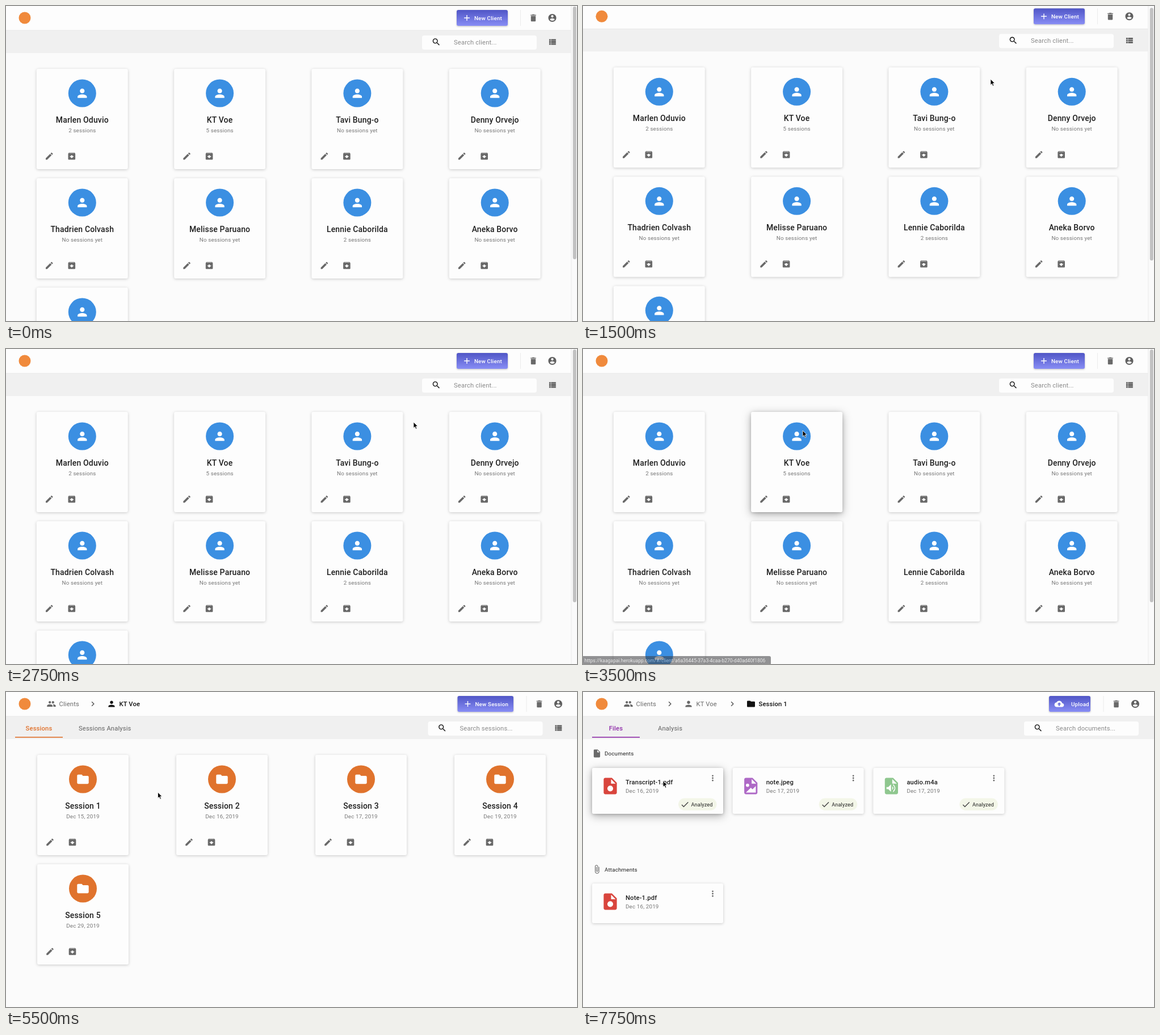
An HTML page for the animation above (8000 ms loop, 1006 px wide and 556 px high).

```html
<!DOCTYPE html>
<html lang="en">
<head>
<meta charset="utf-8">
<title>Client sessions</title>
<style>
  html, body { margin: 0; width: 100%; height: 100%; overflow: hidden; background: #fbfbfb; }
  svg { display: block; font-family: Roboto, sans-serif; letter-spacing: .01em; }
  .card { fill: #fdfdfd; filter: drop-shadow(0 1.5px 2.5px rgba(0, 0, 0, .2)); }
  .lift { fill: #fdfdfd; opacity: 0; filter: drop-shadow(0 4px 8px rgba(0, 0, 0, .3)); }
  .button { fill: url(#violet); filter: drop-shadow(0 1px 1.5px rgba(0, 0, 0, .25)); }
</style>
</head>
<body>
<svg id="stage" width="1006" height="556" viewBox="0 0 1006 556"></svg>
<script>
const GREY = '#696969', DARK = '#1f1f1f', SOFT = '#777';
const icons = {
  person: 'M12 12c2.21 0 4-1.79 4-4s-1.79-4-4-4-4 1.79-4 4 1.79 4 4 4zm0 2c-2.67 0-8 1.34-8 4v2h16v-2c0-2.66-5.33-4-8-4z',
  people: 'M16 11c1.66 0 3-1.34 3-3s-1.34-3-3-3-3 1.34-3 3 1.34 3 3 3zm-8 0c1.66 0 3-1.34 3-3S9.66 5 8 5 5 6.34 5 8s1.34 3 3 3zm0 2c-2.33 0-7 1.17-7 3.5V19h14v-2.5c0-2.33-4.67-3.5-7-3.5zm8 0c-.29 0-.62.02-.97.05 1.16.84 1.97 1.97 1.97 3.45V19h6v-2.5c0-2.33-4.67-3.5-7-3.5z',
  edit: 'M3 17.25V21h3.75L17.81 9.94l-3.75-3.75L3 17.25zM20.71 7.04c.39-.39.39-1.02 0-1.41l-2.34-2.34c-.39-.39-1.02-.39-1.41 0l-1.83 1.83 3.75 3.75 1.83-1.83z',
  archive: 'M20.54 5.23l-1.39-1.68C18.88 3.21 18.47 3 18 3H6c-.47 0-.88.21-1.16.55L3.46 5.23C3.17 5.57 3 6.02 3 6.5V19c0 1.1.9 2 2 2h14c1.1 0 2-.9 2-2V6.5c0-.48-.17-.93-.46-1.27zM12 17.5L6.5 12H10v-2h4v2h3.5L12 17.5zM5.12 5l.81-1h12l.94 1H5.12z',
  trash: 'M6 19c0 1.1.9 2 2 2h8c1.1 0 2-.9 2-2V7H6v12zM19 4h-3.5l-1-1h-5l-1 1H5v2h14V4z',
  account: 'M12 2C6.48 2 2 6.48 2 12s4.48 10 10 10 10-4.48 10-10S17.52 2 12 2zm0 3c1.66 0 3 1.34 3 3s-1.34 3-3 3-3-1.34-3-3 1.34-3 3-3zm0 14.2c-2.5 0-4.71-1.28-6-3.22.03-1.99 4-3.08 6-3.08 1.99 0 5.97 1.09 6 3.08-1.29 1.94-3.5 3.22-6 3.22z',
  search: 'M15.5 14h-.79l-.28-.27C15.41 12.59 16 11.11 16 9.5 16 5.91 13.09 3 9.5 3S3 5.91 3 9.5 5.91 16 9.5 16c1.61 0 3.09-.59 4.23-1.57l.27.28v.79l5 4.99L20.49 19l-4.99-5zm-6 0C7.01 14 5 11.99 5 9.5S7.01 5 9.5 5 14 7.01 14 9.5 11.99 14 9.5 14z',
  list: 'M4 14h4v-4H4zm0 5h4v-4H4zM4 9h4V5H4zm5 5h12v-4H9zm0 5h12v-4H9zM9 5v4h12V5z',
  add: 'M19 13h-6v6h-2v-6H5v-2h6V5h2v6h6z',
  chevron: 'M10 6L8.59 7.41 13.17 12l-4.58 4.59L10 18l6-6z',
  folder: 'M10 4H4c-1.1 0-2 .9-2 2v12c0 1.1.9 2 2 2h16c1.1 0 2-.9 2-2V8c0-1.1-.9-2-2-2h-8z',
  upload: 'M19.35 10.04C18.67 6.59 15.64 4 12 4 9.11 4 6.6 5.64 5.35 8.04 2.34 8.36 0 10.91 0 14c0 3.31 2.69 6 6 6h13c2.76 0 5-2.24 5-5 0-2.64-2.05-4.78-4.65-4.96zM14 13v4h-4v-4H7l5-5 5 5z',
  file: 'M6 2c-1.1 0-2 .9-2 2v16c0 1.1.9 2 2 2h12c1.1 0 2-.9 2-2V8l-6-6zm7 7V3.5L18.5 9z',
  clip: 'M16.5 6v11.5c0 2.21-1.79 4-4 4s-4-1.79-4-4V5c0-1.38 1.12-2.5 2.5-2.5s2.5 1.12 2.5 2.5v10.5c0 .55-.45 1-1 1s-1-.45-1-1V6H10v9.5c0 1.38 1.12 2.5 2.5 2.5s2.5-1.12 2.5-2.5V5c0-2.21-1.79-4-4-4S7 2.79 7 5v12.5c0 3.04 2.46 5.5 5.5 5.5s5.5-2.46 5.5-5.5V6z',
  check: 'M9 16.2L4.8 12l-1.4 1.4L9 19 21 7l-1.4-1.4z',
  more: 'M10 6a2 2 0 1 1 4 0 2 2 0 1 1-4 0m0 6a2 2 0 1 1 4 0 2 2 0 1 1-4 0m0 6a2 2 0 1 1 4 0 2 2 0 1 1-4 0',
  dot: 'M8.5 15a3.5 3.5 0 1 1 7 0 3.5 3.5 0 1 1-7 0',
  picture: 'M6 20h12v-8l-4 4-2-2zM6 11a2 2 0 1 1 4 0 2 2 0 1 1-4 0',
  speaker: 'M6 13.2h2.2L11.5 10v9l-3.300-3.200H6zM13 12.200q2.500 2.300 0 4.600zM14 9.500q5.500 5 0 10v-1.500q3.500-3.500 0-7z'
};

const rect = (x, y, w, h, fill, r = 0, cls = '') =>
  `<rect x="${x}" y="${y}" width="${w}" height="${h}" rx="${r}" fill="${fill}" class="${cls}"/>`;
const circle = (x, y, r, fill) => `<circle cx="${x}" cy="${y}" r="${r}" fill="${fill}"/>`;
const icon = (name, x, y, fill = GREY, s = .7) =>
  `<path d="${icons[name]}" fill="${fill}" transform="translate(${x} ${y}) scale(${s}) translate(-12 -12)"/>`;
const text = (str, x, y, size, fill = DARK, weight = 400, anchor = 'start') =>
  `<text x="${x}" y="${y}" font-size="${size}" fill="${fill}" font-weight="${weight}" text-anchor="${anchor}">${str}</text>`;
const panel = (x, y, w, h, id) =>
  rect(x, y, w, h, '', 3, 'card') + `<g id="${id}">${rect(x, y, w, h, '', 3, 'lift')}</g>`;

function frame({ width, button, buttonIcon, buttonX, buttonW, searchX, hint, list }) {
  const right = width - 33;
  return rect(0, 0, width, 43, '#fdfdfd') + rect(0, 43, width, 40, '#f0f0f0') + rect(0, 42.5, width, 1, '#e9e9e9')
    + circle(33, 21, 10.5, '#f08a3c')
    + rect(buttonX, 7, buttonW, 28, '', 3, 'button')
    + icon(buttonIcon, buttonX + 18, 21, '#fff')
    + text(button, buttonX + (buttonIcon == 'add' ? 31 : 39), 24.5, 9.8, '#fff', 500)
    + rect(right - 56.5, 7, 1, 28, '#ececec')
    + icon('trash', right - 33.5, 21) + icon('account', right, 21, '#606060')
    + rect(searchX, 52, 202, 25, '#fdfdfd', 4)
    + icon('search', searchX + 25, 63.5, '#111')
    + text(hint, searchX + 56, 68, 11.2, '#8a8a8a')
    + (list ? icon('list', right, 63.5, '#606060') : '');
}

function crumbs(items) {
  return items.map(([name, label, x], i) => {
    const last = i == items.length - 1, color = last ? '#111' : GREY;
    return icon(name, x, 21, color) + text(label, x + 13.5, 25, 11.2, color, last ? 500 : 400)
      + (last ? '' : icon('chevron', [153, 263][i], 21, '#555'));
  }).join('');
}

const tabs = (active, activeX, color, other, otherX) =>
  text(active, activeX, 68, 11.2, color, 500, 'middle') + rect(16, 79, 84, 1.6, color)
  + text(other, otherX, 68, 11.2, '#606060');

function tiles(scene, items, left, pitch, color, glyph) {
  return items.map(([title, note], i) => {
    const x = left + i % 4 * pitch, y = 111 + Math.floor(i / 4) * 193, mid = x + 80.5;
    return panel(x, y, 161, 177, `lift${scene}-${i}`)
      + circle(mid, y + 43, 24.5, color) + icon(glyph, mid, y + 43, '#fff', 1.02)
      + text(title, mid, y + 95, 14, DARK, 500, 'middle')
      + text(note, mid, y + 111.5, 9.8, SOFT, 400, 'middle')
      + icon('edit', x + 22.500, y + 154) + icon('archive', x + 62, y + 154);
  }).join('');
}

function fileCard(i, x, y, title, date, color, glyph, analyzed = true) {
  return panel(x, y, 231, analyzed ? 81 : 70, 'lift2-' + i)
    + icon('file', x + 32, y + 32, color, 1.45) + icon(glyph, x + 32, y + 32, '#fff', 1.45)
    + text(title, x + 59, y + 29, 11.2, DARK, 500) + text(date, x + 59, y + 44, 9.8, SOFT)
    + icon('more', x + 212.5, y + 18)
    + (analyzed ? rect(x + 152, y + 53.5, 67.5, 21.5, '#f3f6e8', 10.75)
      + icon('check', x + 163.5, y + 64.5, '#444') + text('Analyzed', x + 174.5, y + 67.7, 9.1) : '');
}

const none = 'No sessions yet';
const clients = [['Marlen Oduvio', '2 sessions'], ['KT Voe', '5 sessions'], ['Tavi Bung-o', none], ['Denny Orvejo', none],
  ['Thadrien Colvash', none], ['Melisse Paruano', none], ['Lennie Caborilda', '2 sessions'], ['Aneka Borvo', none], ['Bonny Falg', none]];
const sessions = [15, 16, 17, 19, 29].map((day, i) => [`Session ${i + 1}`, `Dec ${day}, 2019`]);
const host = 'https://kaagapai.herokuapp.com/#/';
const links = ['client/a6a36445-37a3-4caa-b270-d40ad40f1806', 'session/1d3af6c9-73ad-43b5-9d46-dbc488b96...'];

const scenes = [
  frame({ width: 995.5, button: 'New Client', buttonIcon: 'add', buttonX: 794, buttonW: 90, searchX: 733, hint: 'Search client...', list: true })
  + tiles(0, clients, 53.8, 242.3, '#3b8fe2', 'person'),

  frame({ width: 1006, button: 'New Session', buttonIcon: 'add', buttonX: 795.5, buttonW: 98.5, searchX: 743.5, hint: 'Search sessions...', list: true })
  + crumbs([['people', 'Clients', 80], ['person', 'KT Voe', 186]])
  + tabs('Sessions', 58, '#e0702a', 'Sessions Analysis', 128)
  + tiles(1, sessions, 55, 245, '#e0732d', 'folder'),

  frame({ width: 1006, button: 'Upload', buttonIcon: 'upload', buttonX: 821, buttonW: 73, searchX: 777, hint: 'Search documents...' })
  + crumbs([['people', 'Clients', 80], ['person', 'KT Voe', 186], ['folder', 'Session 1', 296]])
  + tabs('Files', 58, '#8e2ba8', 'Analysis', 132)
  + icon('file', 24.5, 108.5) + text('Documents', 38, 112, 9.8)
  + fileCard(0, 16, 134, 'Transcript-1.pdf', 'Dec 16, 2019', '#d9453d', 'dot')
  + fileCard(1, 263.700, 134, 'note.jpeg', 'Dec 17, 2019', '#ae69c6', 'picture')
  + fileCard(2, 511.400, 134, 'audio.m4a', 'Dec 17, 2019', '#8fc78f', 'speaker')
  + icon('clip', 24.5, 313) + text('Attachments', 38, 316.5, 9.8)
  + fileCard(3, 16, 338, 'Note-1.pdf', 'Dec 16, 2019', '#d9453d', 'dot', false)
];

const stage = document.getElementById('stage');
stage.innerHTML = `<defs><linearGradient id="violet" x2="0" y2="1">
    <stop stop-color="#5056c6"/><stop offset="1" stop-color="#888df5"/></linearGradient></defs>`
  + rect(0, 0, 1006, 556, '#fbfbfb')
  + scenes.map((s, i) => `<g id="scene${i}">${s}</g>`).join('')
  + `<g id="bar">${rect(995.5, 0, 10.5, 556, '#fafafa')}${rect(995.5, 0, .8, 556, '#e6e6e6')}
     <g id="thumb">${rect(998.8, 1, 6, 446, '#c1c1c1', 3)}</g></g>`
  + links.map((link, i) => `<g id="link${i}"><path d="M0 542H${328 + i * 3.5}q3 0 3 3V556H0z" fill="#3b3c3f"/>
     <g letter-spacing="0">${text(host + link, 2.5, 552.5, 8.5, '#dcdcdc')}</g></g>`).join('')
  + `<path id="cursor" d="M0 0V10.500L2.400 8.300 4.100 12.200 5.900 11.400 4.200 7.600H7.500z" fill="#000" stroke="#fff" stroke-width=".8"/>`;

const $ = id => document.getElementById(id);
const lifts = [...document.querySelectorAll('.lift')];

// Each step keeps the values of the one before it unless it changes them.
let last = { scene: 0, x: -50, y: 0, scroll: 0, card: 0, lift: 0, link: 0, linkAlpha: 0 };
const steps = [
  { t: 0 },
  { t: 500, x: 697, y: 79 },
  { t: 750, y: 91 },
  { t: 1000, x: 694, y: 105 },
  { t: 1250, x: 718, y: 129 },
  { t: 1500, scroll: 2.7 },
  { t: 1750, scroll: 129 },
  { t: 2500, scroll: 131 },
  { t: 2750, scroll: 0 },
  { t: 3250, x: 402, y: 147, card: 1, lift: .5 },
  { t: 3500, x: 387, y: 144, lift: 1, linkAlpha: .55 },
  { t: 3750, scene: 1, link: 1, linkAlpha: 1 },
  { t: 4000, x: 537, y: 188, lift: 0 },
  { t: 4250, x: 491, y: 182 },
  { t: 4500, x: 481, linkAlpha: .5 },
  { t: 4750, linkAlpha: 0 },
  { t: 5500, x: 267.5, y: 177 },
  { t: 5750, x: 160, y: 165, card: 0, lift: 1 },
  { t: 6000, scene: 2, x: 150, lift: .4 },
  { t: 6250, lift: 1 },
  { t: 6750, x: 215, y: 257, lift: .5 },
  { t: 7000, x: 249, y: 264, lift: 0 },
  { t: 7250, x: 226, y: 246 },
  { t: 7500, x: 141, y: 157, lift: .4 },
  { t: 7750, lift: 1 }
].map(step => last = { ...last, ...step });

function draw() {
  const now = performance.now() % 8000;
  const s = steps.findLast(step => step.t <= now);
  scenes.forEach((_, i) => $('scene' + i).style.display = i == s.scene ? '' : 'none');
  $('bar').style.display = s.scene ? 'none' : '';
  $('scene0').setAttribute('transform', `translate(0 ${-s.scroll})`);
  $('thumb').setAttribute('transform', `translate(0 ${s.scroll * .8})`);
  $('cursor').setAttribute('transform', `translate(${s.x} ${s.y})`);
  lifts.forEach(el => el.style.opacity = 0);
  $(`lift${s.scene}-${s.card}`).firstChild.style.opacity = s.lift;
  links.forEach((_, i) => $('link' + i).style.opacity = i == s.link ? s.linkAlpha : 0);
  requestAnimationFrame(draw);
}
draw();
</script>
</body>
</html>
```
